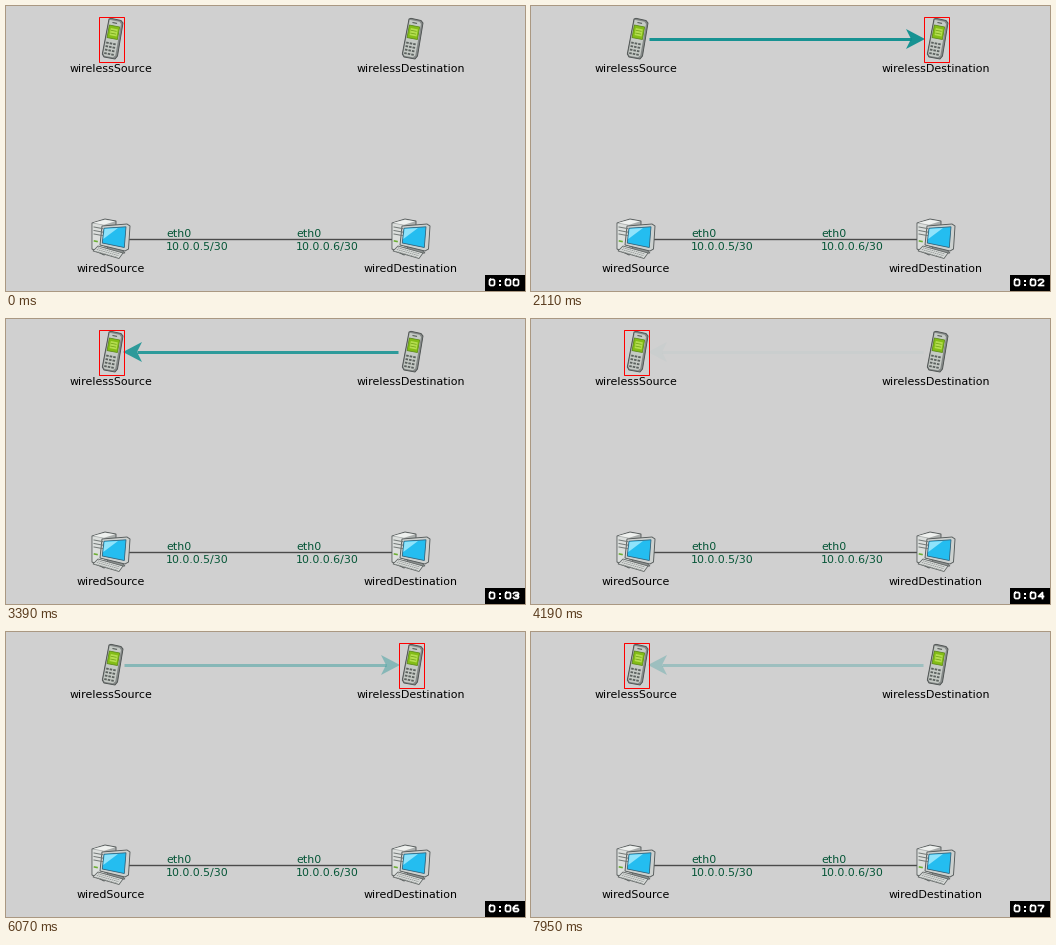
These frames come from a looping animation (519x285 px, 8 s). A matplotlib script:

```python
import matplotlib.pyplot as plt
from matplotlib.animation import FuncAnimation
from matplotlib.patches import Polygon, Rectangle

W, H = 519, 285
LOOP, STEP = 8000, 40
LEFT, RIGHT = 105, 405
TEAL = "#008b8b"

fig = plt.figure(figsize=(W / 72, H / 72), dpi=72, facecolor="#d0d0d0")
ax = fig.add_axes([0, 0, 1, 1])
ax.set(xlim=(0, W), ylim=(H, 0))
ax.axis("off")


def poly(points, face, edge="none", lw=0.7, dx=0, **style):
    shape = Polygon([(x + dx, y) for x, y in points], closed=True,
                    facecolor=face, edgecolor=edge, linewidth=lw, **style)
    return ax.add_patch(shape)


def stroke(points, color, lw, dx=0, **style):
    xs, ys = zip(*points)
    return ax.plot([x + dx for x in xs], ys, color=color, lw=lw, **style)[0]


def label(x, baseline, text, color="black", ha="center"):
    ax.text(x, baseline, text, color=color, ha=ha, va="baseline",
            family="DejaVu Sans", size=10.95)


def phone(dx):
    poly([(103, 13), (105, 12.3), (115, 14.5), (117, 17), (111.5, 50),
          (109, 53), (98, 51), (96.3, 48)], "#858988", "#4c5150", 0.9, dx)
    poly([(103.7, 13.8), (113.5, 15.8), (115, 18), (109.3, 49.5),
          (107, 51.3), (98.5, 49.8), (97.3, 47.5)], "#c5cac5", dx=dx)
    stroke([(107, 16.6), (110.5, 17.3)], "#555b58", 1.1, dx)
    poly([(103.4, 19), (113.6, 21), (111.4, 33.5), (101.1, 31.6)],
         "#83bd16", "#5d8a18", 0.8, dx)
    poly([(104.8, 22), (111.8, 23.4), (110.6, 30.5), (103.6, 29.1)],
         "#b4de4e", dx=dx)
    for row in range(2):
        x, y = 105.2 - 0.5 * row, 24.3 + 2.8 * row
        stroke([(x, y), (x + 5, y + 1)], "#74a51a", 0.8, dx)
    for row in range(4):
        for col in range(3):
            x = 100.4 - 0.65 * row + 3.5 * col
            y = 35.6 + 3.5 * row + 0.7 * col
            poly([(x, y), (x + 2.5, y + 0.5), (x + 2.1, y + 2.3),
                  (x - 0.4, y + 1.8)], "#5c625f", dx=dx)


def computer(dx):
    # tower
    poly([(86, 217), (99, 213), (110, 215), (110, 244), (98, 249), (86, 243)],
         "#a9adac", "#555a5a", 0.9, dx)
    poly([(86.6, 217.4), (98, 219.5), (98, 247.6), (86.6, 242.5)],
         "#dcdfdd", dx=dx)
    poly([(87.5, 216.7), (99, 213.7), (109, 215.4), (98, 218.8)],
         "#eef0ee", dx=dx)
    for y in (221, 224.5, 228):
        stroke([(88, y), (96.5, y + 1.6)], "#737977", 1, dx)
    stroke([(88.5, 235), (91, 235.5)], "#6cae31", 1.6, dx)
    # monitor
    poly([(102, 240), (115, 243), (119, 247), (108, 248), (101, 244)],
         "#8d9291", "#5b605f", 0.7, dx)
    poly([(96, 220), (121, 218), (124, 220), (122.5, 243), (119, 245),
          (94, 239)], "#cdd1cf", "#535858", 0.9, dx)
    poly([(98, 222.2), (120, 220.8), (118.3, 241.5), (96.3, 237)],
         "#24bdf0", "#2d5f78", 0.8, dx)
    poly([(98.6, 222.9), (112, 222), (97.3, 233)], "#8fe3fb", dx=dx)
    # keyboard
    poly([(92, 240), (117, 247), (113, 252.5), (87, 245)],
         "#d9dcda", "#5d6261", 0.8, dx)
    for row in range(3):
        x, y = 92 - 1.2 * row, 241.8 + 1.7 * row
        stroke([(x, y), (x + 22, y + 6.2)], "#8c918f", 0.8, dx,
               linestyle=(0, (2, 0.8)))


stroke([(LEFT, 233), (RIGHT, 233)], "#4a4a4a", 1.4, zorder=0.5)
for dx, name in ((0, "Source"), (RIGHT - LEFT, "Destination")):
    phone(dx)
    computer(dx)
    label(LEFT + dx, 66, "wireless" + name)
    label(LEFT + dx, 266, "wired" + name)
for x, address in ((160, "10.0.0.5/30"), (290, "10.0.0.6/30")):
    label(x, 231, "eth0", "#045536", "left")
    label(x, 244, address, "#045536", "left")


def arrow(tail, tip):
    side = 1 if tip > tail else -1
    notch = tip - 14 * side
    return [stroke([(tail, 33), (notch, 33)], TEAL, 3, solid_capstyle="butt"),
            poly([(tip, 33), (tip - 19 * side, 23), (notch, 33),
                  (tip - 19 * side, 43)], TEAL, zorder=2)]


to_right, to_left = arrow(118, 394), arrow(392, 117)
SENDS = [(1960, to_right), (3050, to_left), (5240, to_right), (7090, to_left)]


def opacity(age):
    """Fade in even steps, one about every 115 ms."""
    return max(0, 1 - 0.108 * (age // 115)) if age >= 0 else 0


# Selection rectangles: x, y, width, height
SOURCE = (92.5, 10.5, 25, 45)
DEST = (392.5, 10.5, 25, 45)
WIRED = (82.5, 210.5, 45, 45)
SELECTIONS = [(0, SOURCE), (360, DEST), (480, WIRED), (710, SOURCE),
              (820, DEST), (1780, SOURCE), (1960, DEST), (3050, SOURCE),
              (4420, DEST), (5020, SOURCE), (5240, DEST), (6520, SOURCE),
              (6760, DEST), (7090, SOURCE)]
selection = ax.add_patch(Rectangle((0, 0), 1, 1, fill=False, ec="red", lw=1,
                                   zorder=4))

# Clock digits as strokes on a 5 by 6 grid
DIGITS = [
    [(1, 0), (4, 0), (5, 1), (5, 5), (4, 6), (1, 6), (0, 5), (0, 1), (1, 0)],
    [(1, 1), (2.5, 0), (2.5, 6), (0.5, 6), (4.5, 6)],
    [(0, 1), (1, 0), (4, 0), (5, 1), (5, 2), (0, 6), (5, 6)],
    [(0, 1), (1, 0), (4, 0), (5, 1), (5, 2), (4, 3), (2, 3), (4, 3), (5, 4),
     (5, 5), (4, 6), (1, 6), (0, 5)],
    [(4, 6), (4, 0), (0, 4), (5, 4)],
    [(5, 0), (0, 0), (0, 2.5), (4, 2.5), (5, 3.5), (5, 5), (4, 6), (1, 6),
     (0, 5)],
    [(4, 0), (2, 0), (0, 2), (0, 5), (1, 6), (4, 6), (5, 5), (5, 4), (4, 3),
     (0, 3)],
    [(0, 0), (5, 0), (5, 1), (2.5, 4), (2.5, 6)],
]


def digit_points(value, x):
    return [(x + px, 273.5 + py) for px, py in DIGITS[value]]


ax.add_patch(Rectangle((479, 269), 40, 16, color="black", lw=0, zorder=5))
for x in (483.5, 499.5):
    stroke(digit_points(0, x), "white", 1.7, zorder=6)
for y in (274, 278):
    ax.add_patch(Rectangle((493, y), 2, 2, color="white", lw=0, zorder=6))
seconds = stroke(digit_points(0, 507.5), "white", 1.7, zorder=6)


def update(frame):
    t = frame * STEP
    for parts in (to_right, to_left):
        alpha = max(opacity(t - start) for start, sent in SENDS
                    if sent is parts)
        for part in parts:
            part.set_alpha(alpha)
    box = [rect for start, rect in SELECTIONS if t + STEP > start][-1]
    selection.set_bounds(*box)
    second = min((t + 70) // 1000, len(DIGITS) - 1)
    seconds.set_data(*zip(*digit_points(second, 507.5)))
    return [*to_right, *to_left, selection, seconds]


anim = FuncAnimation(fig, update, frames=LOOP // STEP, interval=STEP,
                     repeat=True, repeat_delay=0)
plt.show()
```
